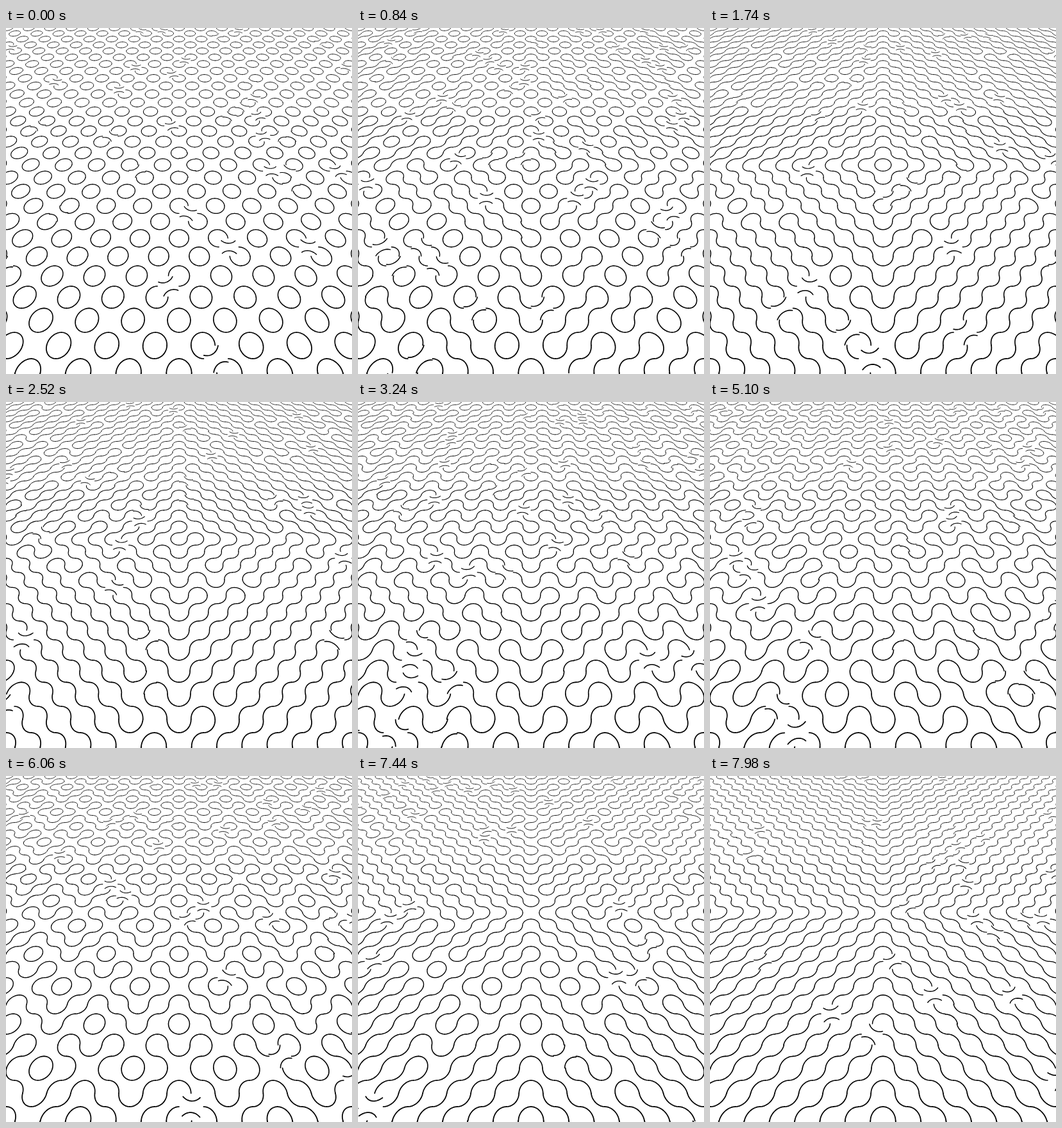
An HTML page with a canvas that plays this animation: 540x540 px, repeating every 8 s.

```html
<!DOCTYPE html>
<html lang="en">
<head>
<meta charset="utf-8">
<title>Turning tiles</title>
<style>
  html, body { margin: 0; width: 100%; height: 100%; overflow: hidden; background: #fff; }
  canvas { display: block; width: 540px; height: 540px; }
</style>
</head>
<body>
<canvas id="stage" width="540" height="540"></canvas>
<script>
const ctx = document.getElementById('stage').getContext('2d');

const LOOP = 8000, STEP = 60;
const PERIOD = 2000, TURN = 320, LAG = 60;

// Camera: a plane tilted by 35 degrees; depth is counted in tiles.
const HORIZON = -397.87, DROP = 19391, SCALE = 815.3, NEAR = 22.715;
const CENTER = 270, MID_ROW = 9;

const mod = (a, n) => ((a % n) + n) % n;

// Each pattern says whether a tile leans right (1) or left (0).
const FLOWER = ['0011', '0101', '1100', '1100'];
const cross = (i, j) => (i >= 0) === (j < MID_ROW) ? 1 : 0;
const patterns = [
  (i, j) => 1 - mod(i + j, 2),
  (i, j) => 1 - cross(i, j),
  (i, j) => mod(i, 2),
  (i, j) => +FLOWER[mod(j, 4)][mod(i, 4)],
  cross
];

function random(i, j) {
  let h = Math.imul(i + 101, 374761393) ^ Math.imul(j + 57, 668265263);
  h = Math.imul(h ^ (h >>> 13), 1274126177);
  h = Math.imul(h ^ (h >>> 16), 2246822519);
  return ((h ^ (h >>> 15)) >>> 0) / 4294967296;
}

const tiles = [];
for (let j = 27; j >= -4; j--) {
  const half = Math.ceil(CENTER * (NEAR + j + 1) / SCALE) + 1;
  for (let i = -half; i < half; i++) {
    tiles.push({ i, j, delay: random(i, j), leans: patterns.map(p => p(i, j)) });
  }
}

const ease = p => p * p * (3 - 2 * p);

function lean(tile, t) {
  const local = t - LAG + TURN / 2 - tile.delay * PERIOD;
  const k = Math.floor(local / PERIOD);
  const p = Math.min(1, (local - k * PERIOD) / TURN);
  const from = tile.leans[mod(k, 5)], to = tile.leans[mod(k + 1, 5)];
  return from + (to - from) * ease(p);
}

function plot(x, depth, first) {
  const sx = CENTER + x * SCALE / depth, sy = HORIZON + DROP / depth;
  if (first) ctx.moveTo(sx, sy); else ctx.lineTo(sx, sy);
}

function drawTile(tile, t) {
  const x = tile.i + 0.5, depth = NEAR + tile.j + 0.5;
  const angle = (lean(tile, t) - 0.5) * Math.PI / 2;
  const segments = 10;
  ctx.lineWidth = 0.045 * SCALE / depth;
  ctx.beginPath();
  for (const a of [angle, angle + Math.PI]) {
    const cx = x + Math.SQRT1_2 * Math.sin(a);
    const cd = depth + Math.SQRT1_2 * Math.cos(a);
    for (let s = 0; s <= segments; s++) {
      const b = a + (s / segments - 0.5) * Math.PI / 2;
      plot(cx - 0.5 * Math.sin(b), cd - 0.5 * Math.cos(b), s === 0);
    }
  }
  ctx.stroke();
}

function draw(t) {
  ctx.fillStyle = '#fff';
  ctx.fillRect(0, 0, 540, 540);
  ctx.strokeStyle = '#000';
  ctx.lineCap = 'round';
  ctx.lineJoin = 'round';
  for (const tile of tiles) drawTile(tile, t);
}

function tick() {
  const t = performance.now() % LOOP;
  draw(Math.floor(t / STEP) * STEP);
  requestAnimationFrame(tick);
}
tick();
</script>
</body>
</html>
```
